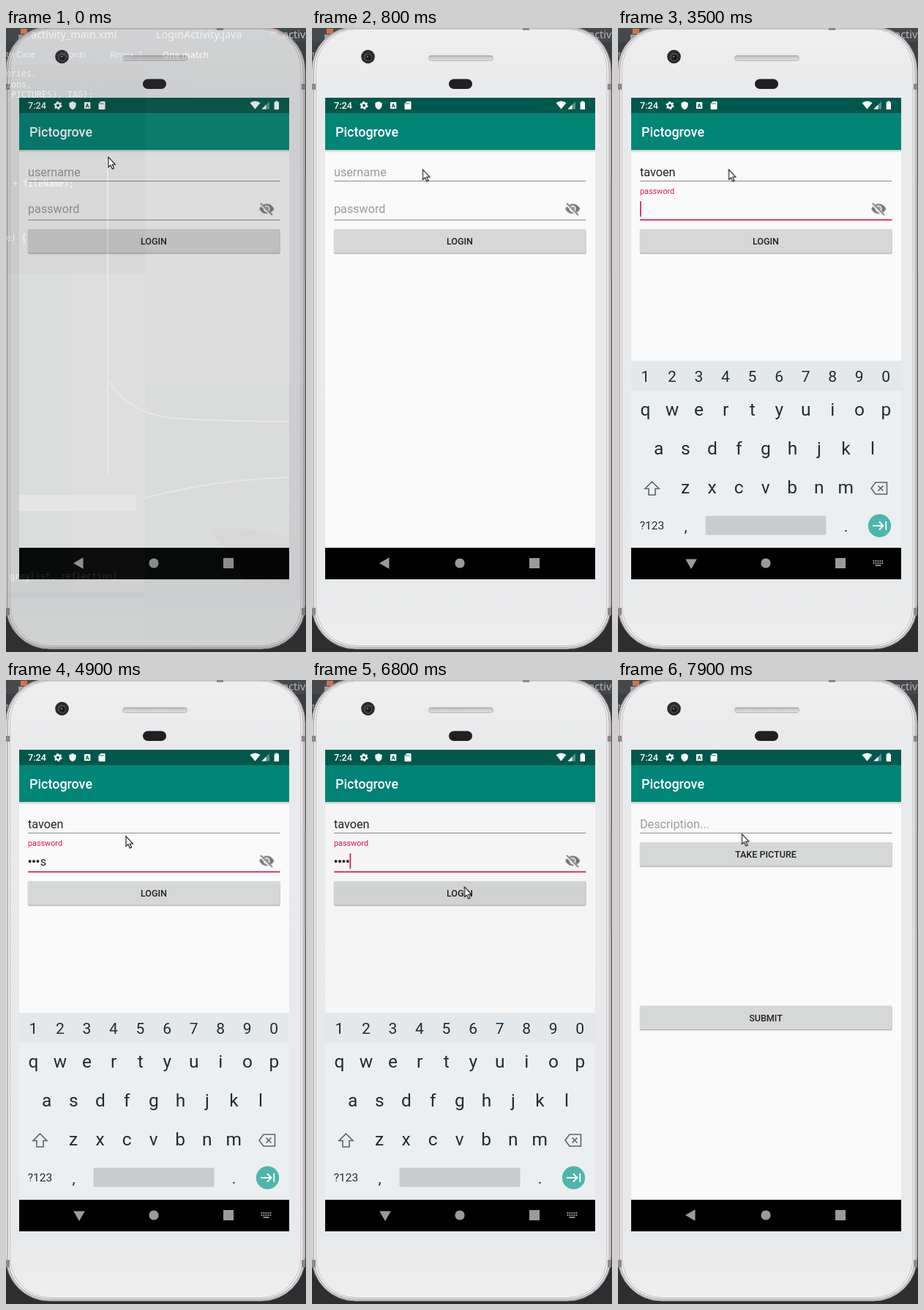
Recreate the animation shown at these times as an HTML page. Size 410x850 px, loop 8000 ms.

```html
<!DOCTYPE html>
<html lang="en">
<head>
<meta charset="utf-8">
<title>Login demo</title>
<style>
html, body { margin: 0; width: 100%; height: 100%; overflow: hidden; background: #2d2e2f; }
svg { display: block; width: 410px; height: 850px; }
text { font-family: Roboto, sans-serif; }
.field { font-size: 16.2px; fill: #212121; }
.hint { font-size: 16.2px; fill: #9b9b9b; }
.label { font-size: 10.8px; fill: #d81b60; }
.button text { font-size: 12.57px; font-weight: 500; fill: #212121; text-anchor: middle; }
.rule { fill: #8c8c8c; }
.pink { fill: #d81b60; }
.title { font-size: 17.95px; font-weight: 500; fill: #fff; }
.key { fill: #1f2d33; text-anchor: middle; }
.ide text { font: 11.65px "DejaVu Sans Mono", monospace; fill: #fff; }
.ide .ui { font: 14.5px "Noto Sans", sans-serif; }
.ide .small { font: 11.5px "Noto Sans", sans-serif; }

/* One shared 8 s timeline: 1.25% is 100 ms */
[class*="t-"] { animation: 8s step-end infinite; }
.t-ghost { animation-name: ghost; }
.t-mouse { animation-name: mouse; }
.t-before { animation-name: before; }
.t-after { animation-name: after; }
.t-focus { animation-name: focus; }
.t-user-caret { animation-name: user-caret; }
.t-ime { animation-name: ime; }
.t-no-ime { animation-name: no-ime; }
.t-keys { animation-name: keys; }
.t-pw0 { animation-name: pw0; }
.t-pw1 { animation-name: pw1; }
.t-pw2 { animation-name: pw2; }
.t-pw3 { animation-name: pw3; }
.t-pw4 { animation-name: pw4; }
.t-pw-caret { animation-name: pw-caret; }
.t-ripple { animation-name: ripple; transform-origin: 208px 290px; }
.t-dim { animation-name: dim; }
.t-login { animation-name: login; }
.t-post { animation-name: post; }
.t-slide { animation-name: slide; }

@keyframes ghost { 0% { opacity: .16 } 10%, 100% { opacity: 0 } }
@keyframes mouse {
  0% { transform: translate(140px, 176px) }
  1.25% { transform: translate(143px, 181px) }
  2.5% { transform: translate(147px, 187px) }
  3.75% { transform: translate(150px, 191px) }
  5% { transform: translate(151.5px, 193px) }
  61.25% { transform: translate(164px, 213px) }
  62.5% { transform: translate(185px, 247px) }
  63.75% { transform: translate(202px, 273px) }
  65% { transform: translate(208.5px, 282px) }
  86.25% { transform: translate(212px, 292px) }
  87.5% { transform: translate(223.5px, 313px) }
  88.75% { transform: translate(236px, 333px) }
  90% { transform: translate(243px, 344px) }
  91.25%, 95% { transform: translate(247px, 350px) }
  96.25% { transform: translate(222px, 305px) }
  97.5% { transform: translate(187px, 241px) }
  98.75%, 100% { transform: translate(169.5px, 210px) }
}
@keyframes before { 0% { opacity: 1 } 43.75%, 100% { opacity: 0 } }
@keyframes after { 0% { opacity: 0 } 43.75%, 100% { opacity: 1 } }
@keyframes focus { 0% { opacity: 0 } 13.75% { opacity: 1 } 43.75%, 100% { opacity: 0 } }
@keyframes user-caret { 0% { opacity: 0 } 13.75% { opacity: 1 } 18.75% { opacity: 0 } 23.75% { opacity: 1 } 43.75%, 100% { opacity: 0 } }
@keyframes ime { 0% { opacity: 0 } 25% { opacity: 1 } 86.25%, 100% { opacity: 0 } }
@keyframes no-ime { 0% { opacity: 1 } 25% { opacity: 0 } 86.25%, 100% { opacity: 1 } }
@keyframes keys {
  0% { opacity: 0; transform: none }
  43.75% { opacity: 1; transform: none }
  86.25% { opacity: .75; transform: translateY(12px) }
  87.5% { opacity: .32; transform: translateY(34.5px) }
  88.75% { opacity: .08; transform: translateY(62px) }
  90%, 100% { opacity: 0; transform: translateY(80px) }
}
@keyframes pw0 { 0% { opacity: 0 } 43.75% { opacity: 1 } 50%, 100% { opacity: 0 } }
@keyframes pw1 { 0% { opacity: 0 } 50% { opacity: 1 } 52.5%, 100% { opacity: 0 } }
@keyframes pw2 { 0% { opacity: 0 } 52.5% { opacity: 1 } 55%, 100% { opacity: 0 } }
@keyframes pw3 { 0% { opacity: 0 } 55% { opacity: 1 } 73.75%, 100% { opacity: 0 } }
@keyframes pw4 { 0% { opacity: 0 } 73.75%, 100% { opacity: 1 } }
@keyframes pw-caret { 0% { opacity: 1 } 61.25% { opacity: 0 } 67.5%, 100% { opacity: 1 } }
@keyframes ripple {
  0% { opacity: 0; transform: scale(0) }
  67.5% { opacity: .15; transform: scale(.4) }
  68.75% { opacity: .15; transform: scale(1) }
  70% { opacity: .15; transform: scale(1.4) }
  71.25% { opacity: .1; transform: scale(1.4) }
  72.5% { opacity: .05; transform: scale(1.4) }
  73.75%, 100% { opacity: 0; transform: scale(1.4) }
}
@keyframes dim { 0% { opacity: 0 } 83.75% { opacity: .01 } 85%, 100% { opacity: .022 } }
@keyframes login { 0% { opacity: 1 } 86.25%, 100% { opacity: 0 } }
@keyframes post { 0% { opacity: 0 } 86.25%, 100% { opacity: 1 } }
@keyframes slide {
  0% { transform: none }
  86.25% { transform: translateY(9px) }
  87.5% { transform: translateY(1.8px) }
  88.75%, 100% { transform: none }
}
</style>
</head>
<body>
<svg viewBox="0 0 410 850">
  <defs>
    <linearGradient id="face" x2="0" y2="1">
      <stop stop-color="#efeff0"/><stop offset=".1" stop-color="#e9eaeb"/>
      <stop offset=".9" stop-color="#e8e9ea"/><stop offset="1" stop-color="#eeeeef"/>
    </linearGradient>
    <linearGradient id="grille" x2="0" y2="1">
      <stop stop-color="#a9a9aa"/><stop offset=".4" stop-color="#cfcfd0"/><stop offset="1" stop-color="#dedede"/>
    </linearGradient>
    <linearGradient id="shade" x2="0" y2="1">
      <stop stop-opacity=".2"/><stop offset="1" stop-opacity="0"/>
    </linearGradient>
    <clipPath id="screen"><path d="M18 95h369v656H18z"/></clipPath>
    <clipPath id="loginShape"><rect x="30" y="274" width="344.5" height="32.5" rx="2"/></clipPath>
  </defs>

  <!-- desktop behind the phone -->
  <path fill="#2d2e2f" d="M0 0h410v850H0z"/>
  <path fill="#46494b" d="M0 0h410v19H0z"/>
  <path fill="#3c3f41" d="M0 19h410v27H0z"/>
  <path fill="#d5724c" d="M20 1h9v7h-9z"/><path fill="#9aa7b0" d="M17 9h11v6H17z"/>
  <g class="ide"><text class="ui" x="378" y="14" style="fill:#b5b8ba">activ</text>
  <text class="small" x="0" y="40" style="fill:#aaa">t</text></g>

  <!-- phone body -->
  <rect x="-.5" y="-2" width="409.5" height="848" rx="60" fill="#d6d0d4" stroke="#807a7e"/>
  <rect x="2.5" y="0" width="403.5" height="843.5" rx="57" fill="#f2eef1" stroke="#aaa3a8"/>
  <rect x="5.5" y="1.5" width="397.5" height="840" rx="55" fill="url(#face)" stroke="#c4bfc3"/>
  <path d="M0 76h5v8H0zM0 790h5v10H0zM404 76h5v8h-5zM404 790h5v10h-5zM288 0h9v3h-9z" fill="#8d878b"/>
  <path d="M408.5 205h1.5v135h-1.5z" fill="#77777a"/>
  <circle cx="76.5" cy="39" r="9.3" fill="#29292b"/>
  <circle cx="76.5" cy="39.5" r="6" fill="#454548"/>
  <circle cx="77" cy="40" r="3.8" fill="#17181b"/>
  <circle cx="76" cy="39" r="1.2" fill="#74777b"/>
  <rect x="159.5" y="37.5" width="88" height="7" rx="3" fill="url(#grille)" stroke="#b9b9ba"/>
  <rect x="187" y="69.5" width="32" height="13.5" rx="6.75" fill="#202023"/>

  <g clip-path="url(#screen)">
    <path fill="#fafafa" d="M18 95h369v656H18z"/>

    <g class="t-login">
      <path fill="#008577" d="M18 116h369v50H18z"/>
      <path fill="url(#shade)" d="M18 166h369v4H18z"/>
      <text class="title" x="32" y="148">Pictogrove</text>

      <text class="hint t-before" x="30" y="201.5">username</text>
      <text class="field t-after" x="30" y="201.5">tavoen</text>
      <path class="rule" d="M30 208h344.5v1H30z"/>
      <path class="pink t-focus" d="M30 207.3h344.5v1.8H30z"/>
      <path class="pink t-user-caret" d="M30 185h1.8v21H30z"/>

      <text class="hint t-before" x="30" y="252">password</text>
      <path class="rule" d="M30 261h344.5v1H30z"/>
      <g class="t-after">
        <text class="label" x="30" y="226">password</text>
        <path class="pink" d="M30 260.4h344.5v1.8H30z"/>
        <g class="t-pw-caret" id="carets"></g>
        <g id="typed"></g>
      </g>
      <g transform="translate(345.5 235.5) scale(.9)" fill="#757575">
        <path d="M12 4.5C7 4.5 2.73 7.61 1 12c1.73 4.39 6 7.5 11 7.5s9.27-3.11 11-7.5c-1.73-4.39-6-7.5-11-7.5zM12 7a5 5 0 1 1 0 10a5 5 0 0 1 0-10z" fill-rule="evenodd"/>
        <circle cx="12" cy="12" r="3"/>
        <path d="M2.5 4.5L20 22" stroke="#fafafa" stroke-width="4.6"/>
        <path d="M2.7 3.6L20.6 21.5" stroke="#757575" stroke-width="1.9"/>
      </g>

      <g class="button" data-y="274" data-label="LOGIN">
        <g clip-path="url(#loginShape)"><circle class="t-ripple" cx="208" cy="290" r="132"/></g>
      </g>
      <path class="t-dim" d="M18 116h369v592H18z"/>
    </g>

    <g class="t-post"><g class="t-slide">
      <path fill="#008577" d="M18 116h369v50H18z"/>
      <path fill="url(#shade)" d="M18 166h369v4H18z"/>
      <text class="title" x="32" y="148">Pictogrove</text>
      <text class="hint" x="30" y="201.5">Description...</text>
      <path class="rule" d="M30 208h344.5v1H30z"/>
      <g class="button" data-y="221" data-label="TAKE PICTURE"></g>
      <g class="button" data-y="443.5" data-label="SUBMIT"></g>
    </g></g>

    <!-- status bar -->
    <path class="t-slide" fill="#00574b" d="M18 80h369v36H18z"/>
    <g fill="#fff">
      <text x="30" y="110.3" font-size="12.6" font-weight="500">7:24</text>
      <circle cx="71" cy="105.5" r="3.2" fill="none" stroke="#fff" stroke-width="2.4"/>
      <circle cx="71" cy="105.5" r="4.8" fill="none" stroke="#fff" stroke-width="1.6" stroke-dasharray="2.5 2.53"/>
      <path d="M91 100l4.6 2v3.2c0 2.8-2 5-4.6 6c-2.600-1-4.600-3.200-4.600-6V102z"/>
      <path d="M107 101h8.300v9h-8.300zM110.500 103l-2 5.500h1.200l.4-1.200h2l.4 1.200h1.200l-2-5.500zM111.100 104.500l.6 1.800h-1.200z" fill-rule="evenodd"/>
      <path d="M129.500 100h5q1 0 1 1v9q0 1-1 1h-7q-1 0-1-1v-7z"/>
      <path d="M333.500 102q7-5 14 0l-7 8.500z"/>
      <path d="M360 100v10.500h-10.500z" opacity=".35"/><path d="M355.500 104.500v6h-6z"/>
      <path d="M368.300 99.500h3v1.200h1.700v10.300h-6.400v-10.300h1.700z"/>
    </g>
    <path d="M128.500 102v2m2-2v2m2-2v2" stroke="#00574b" stroke-width=".8"/>

    <!-- navigation bar and keyboard -->
    <path d="M18 708h369v43H18z"/>
    <g class="t-keys" id="keyboard">
      <path fill="#eceff1" d="M18 453.500h369V708H18z"/>
      <path fill="#e4e8ea" d="M18 453.500h369V494H18z"/>
      <rect x="119.500" y="664.500" width="165" height="26" rx="2" fill="#c9cccf"/>
      <g fill="none" stroke="#57646a" stroke-width="1.600">
        <path d="M46.500 618l9.500 9.500h-5v8.500h-9v-8.500h-5z"/>
        <path d="M352 619h15.500v16H352l-6-8zM355.500 623.500l7 7m0-7l-7 7"/>
      </g>
      <circle cx="357.500" cy="678" r="15.700" fill="#4db6ac"/>
      <path d="M348 678h14.500m-5.500-5.500l5.500 5.500l-5.500 5.500M366.300 672v12" fill="none" stroke="#fff" stroke-width="1.800"/>
    </g>
    <g fill="#9b9b9b">
      <path class="t-no-ime" d="M92 729l13.500-7.700v15.400z"/>
      <circle cx="202" cy="729" r="6.600"/>
      <path d="M297 722h14v14h-14z"/>
      <g class="t-ime">
        <path d="M92.200 723.500h15.600L100 737z"/>
        <path d="M348.500 726h14m-14 3h14" stroke="#999" stroke-width="1.800" stroke-dasharray="1.800 1.200"/>
        <path d="M351.500 732h8" stroke="#999" stroke-width="1.800"/>
      </g>
    </g>
  </g>

  <!-- editor window fading out over the phone -->
  <g class="ide t-ghost">
    <path fill="#3c3f41" d="M0 0h410v850H0z"/>
    <path fill="#2b2b2b" d="M0 50h190v285H0z"/>
    <path fill="#464749" d="M190 100h197v385H190z"/>
    <path fill="#4b4d50" d="M92 335h98v440H92z"/>
    <path fill="#37393b" d="M190 485h220v365H190z"/>
    <path fill="#202123" d="M278 683q45-6 109 12v60l-60-2q-18-34-49-70zM0 768h190v8H0z"/>
    <path fill="none" stroke="#858688" stroke-width="2" d="M139 180v428M140 480q30 48 95 52t152 4M190 640q90-24 197-28"/>
    <path fill="#77787a" d="M18 636h160v22H18z"/>
    <path fill="#d5724c" d="M20 1h9v7h-9zM362 1h9v7h-9z"/>
    <text class="ui" x="34" y="14">activity_main.xml</text>
    <text class="ui" x="205" y="14">LoginActivity.java</text>
    <text class="ui" x="378" y="14">activ</text>
    <text class="small" x="0" y="40">th Case</text>
    <text class="small" x="75" y="40">Words</text>
    <text class="small" x="142" y="40">Regex &#160;?</text>
    <text class="small" x="214" y="41" style="font-weight:700">One match</text>
    <text x="0" y="66">ories.</text>
    <text x="0" y="81">ions,</text>
    <text x="0" y="95">_PICTURES), TAG);</text>
    <text x="9" y="216">+ fileName);</text>
    <text x="0" y="290">e) {</text>
    <text x="5" y="751">greylist, reflection]</text>
  </g>

  <g class="t-mouse">
    <path d="M0 0v13.500l3-2.700l2.300 5.200l2.300-1l-2.300-5h4z" fill="#fff" stroke="#111" stroke-width="1.100"/>
  </g>
</svg>
<script>
const $ = id => document.getElementById(id);

function add(parent, tag, attrs, text = '') {
  const el = document.createElementNS('http://www.w3.org/2000/svg', tag);
  for (const name in attrs) el.setAttribute(name, attrs[name]);
  el.textContent = text;
  parent.append(el);
  return el;
}

document.querySelectorAll('.button').forEach(button => {
  const y = +button.dataset.y;
  const ripple = button.firstElementChild;
  const box = { x: 30, width: 344.5, height: 32.5, rx: 2 };
  add(button, 'rect', { ...box, x: 29.5, width: 345.5, y: y + .3, height: 33.5, opacity: .12 });
  add(button, 'rect', { ...box, y: y + 1.2, opacity: .2 });
  add(button, 'rect', { ...box, y, fill: '#d6d7d7' });
  if (ripple) button.append(ripple);
  add(button, 'text', { x: 202, y: y + 21 }, button.dataset.label);
});

// Password states: bullets, then the last typed letter, then the caret
[[0, '', 30], [0, 't', 38.5], [2, 's', 49.3], [3, 's', 54.3], [4, '', 51.5]].forEach(([dots, letter, caret], i) => {
  const state = add($('typed'), 'g', { class: 't-pw' + i });
  for (let n = 0; n < dots; n++) add(state, 'circle', { cx: 32.6 + n * 5.4, cy: 247, r: 2, fill: '#212121' });
  if (letter) add(state, 'text', { class: 'field', x: 30.5 + dots * 5.4, y: 252.5 }, letter);
  add($('carets'), 'path', { class: 'pink t-pw' + i, d: `M${caret} 236h1.7v21h-1.7z` });
});

[['1234567890', 37.3, 482.3, 21], ['qwertyuiop', 37.5, 528.3, 24.5],
 ['asdfghjkl', 55.7, 580.5, 24.5], ['zxcvbnm', 92, 634, 24.5]].forEach(([chars, x, y, size]) =>
  [...chars].forEach((char, i) =>
    add($('keyboard'), 'text', { class: 'key', x: x + i * 36.55, y, 'font-size': size }, char)));
[['?123', 46.5, 683, 15.5], [',', 92.5, 686, 21], ['.', 311.5, 686, 21]].forEach(([label, x, y, size]) =>
  add($('keyboard'), 'text', { class: 'key', x, y, 'font-size': size }, label));
</script>
</body>
</html>
```
